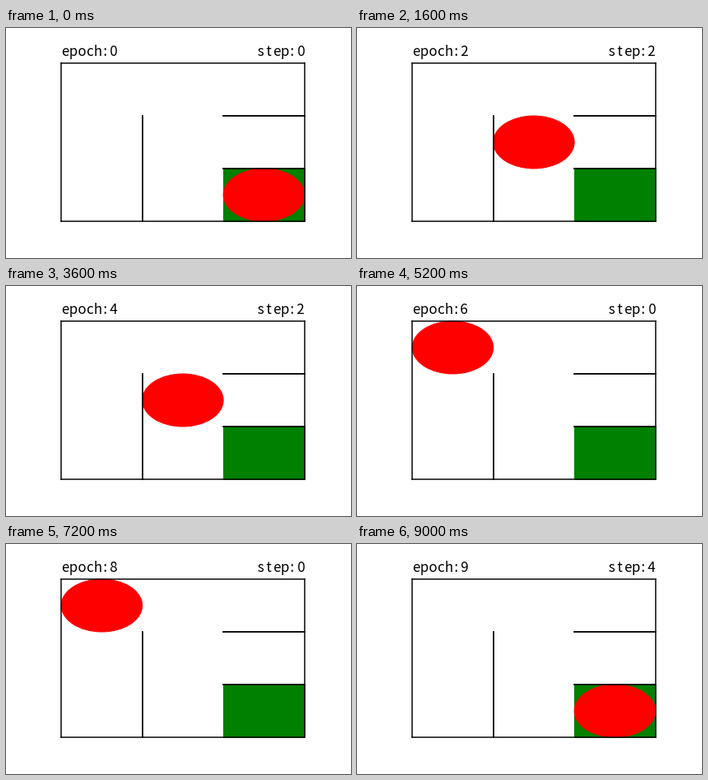
Recreate the animation shown at these times as a matplotlib script. Size 432 px wide and 288 px high, loop 9.2 s.

```python
import matplotlib.pyplot as plt
from matplotlib.animation import FuncAnimation
from matplotlib.patches import Ellipse, Rectangle

W, H, DPI = 432, 288, 72
LEFT, TOP = 69.2, 44
CELL_W, CELL_H = 101.46, 66
COLS, ROWS = 3, 3
PITCH = 10          # width of one character cell
BASELINE = 35
PATH = [(0, 0), (1, 0), (1, 1), (1, 2), (2, 2)]
GOAL = PATH[-1]
EPOCHS = 9
FRAMES = 1 + EPOCHS * len(PATH)

fig = plt.figure(figsize=(W / DPI, H / DPI), dpi=DPI, facecolor="white")
ax = fig.add_axes([0, 0, 1, 1])
ax.set_xlim(0, W)
ax.set_ylim(H, 0)
ax.axis("off")


def corner(col, row):
    return LEFT + col * CELL_W, TOP + row * CELL_H


def center(cell):
    return corner(cell[0] + 0.5, cell[1] + 0.5)


def wall(start, end):
    (x0, y0), (x1, y1) = corner(*start), corner(*end)
    ax.plot([x0, x1], [y0, y1], color="black", lw=1.5)


def mono_text(x, text):
    """Set text on a fixed character grid and return the last character."""
    for i, char in enumerate(text):
        label = ax.text(x + (i + 0.5) * PITCH, BASELINE, char, size=17.5,
                        family="Noto Sans CJK JP", ha="center", va="baseline")
    return label


ax.add_patch(Rectangle(corner(*GOAL), CELL_W, CELL_H, color="green"))
agent = ax.add_patch(Ellipse(center(GOAL), CELL_W, CELL_H, color="red"))

outline = [(0, 0), (COLS, 0), (COLS, ROWS), (0, ROWS), (0, 0)]
for a, b in zip(outline, outline[1:]):
    wall(a, b)

# Inner walls belong to the cells on both sides, so they are drawn twice.
for a, b in [((1, 1), (1, 3)), ((2, 1), (3, 1)), ((2, 2), (3, 2))] * 2:
    wall(a, b)

epoch_digit = mono_text(69.2, "epoch:0")
step_digit = mono_text(313.6, "step:0")


def update(frame):
    if frame == 0:
        epoch, step, cell = 0, 0, GOAL
    else:
        epoch, step = divmod(frame - 1, len(PATH))
        epoch += 1
        cell = PATH[step]
    agent.set_center(center(cell))
    epoch_digit.set_text(str(epoch))
    step_digit.set_text(str(step))
    return agent, epoch_digit, step_digit


anim = FuncAnimation(fig, update, frames=FRAMES, interval=200,
                     repeat=True, repeat_delay=0, blit=False)
plt.show()
```
